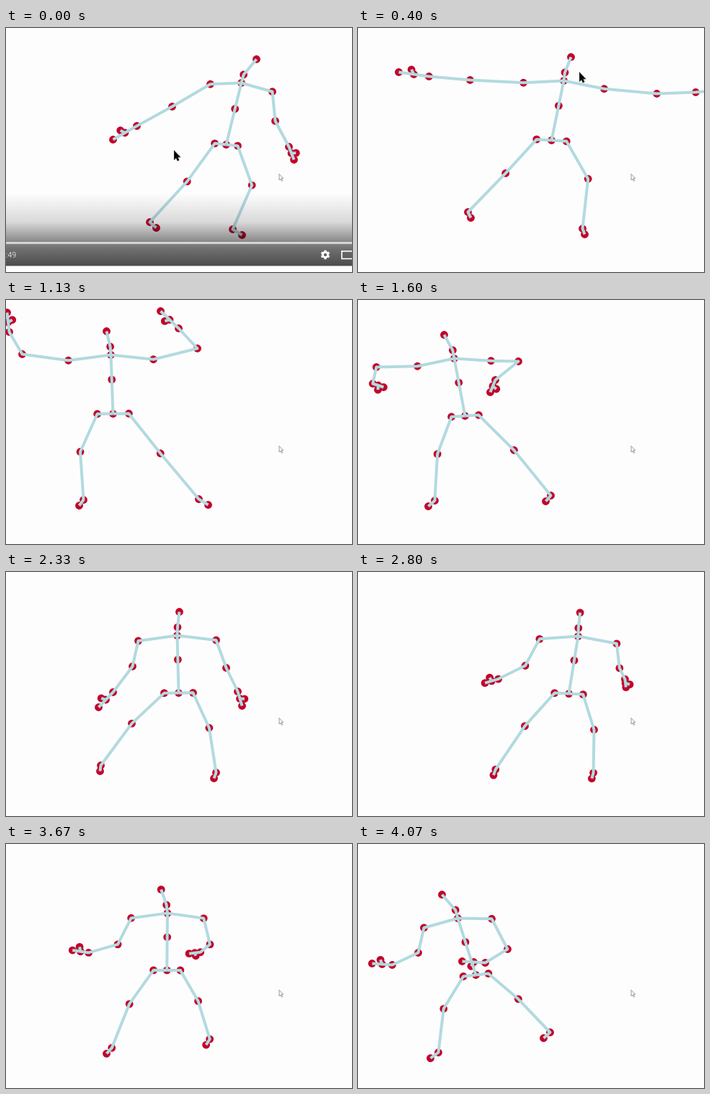
Write an HTML page with a canvas that moves like this. It is 480x340 px and loops after 4140 ms.

```html
<!DOCTYPE html>
<html lang="en">
<head>
<meta charset="utf-8">
<title>Dancing skeleton</title>
<style>
html, body { margin: 0; width: 100%; height: 100%; overflow: hidden; background: #fefdfe; }
canvas { display: block; }
</style>
</head>
<body>
<canvas id="stage" width="480" height="340"></canvas>
<script>
const ctx = document.getElementById('stage').getContext('2d');
const LOOP = 4140, RATE = 15, LAST = 61;

const add = (p, x, y) => [p[0] + x, p[1] + y];
const mix = (p, q, u) => [p[0] + (q[0] - p[0]) * u, p[1] + (q[1] - p[1]) * u];

// A point on the way from p to q, pushed sideways by some pixels.
function beside(p, q, u, push) {
  const dx = q[0] - p[0], dy = q[1] - p[1], len = Math.hypot(dx, dy) || 1;
  return add(mix(p, q, u), push * dy / len, -push * dx / len);
}

// Head, neck, chest, middle and base; shoulders and hips tilt with the lean.
function torso(x, y, lean, rise, nod, width) {
  const base = [x, y], chest = add(base, lean, -rise);
  return {
    spine: [add(chest, nod, -33), add(chest, nod * .15, -11.5), chest, mix(chest, base, .42), base],
    shoulder: side => add(chest, side * width, 7 + side * lean * .25),
    hip: side => add(base, side * width * .37, side * lean * .08)
  };
}

function arm(body, side, [ex, ey, wx, wy, tx, ty]) {
  const wrist = [wx, wy], tip = [tx, ty];
  return [body.shoulder(side), [ex, ey], wrist, mix(wrist, tip, .5), tip,
    beside(wrist, tip, .6, side * 6)];
}

function leg(body, side, [ax, ay, bend, toe]) {
  const hip = body.hip(side), ankle = [ax, ay];
  return [hip, beside(hip, ankle, .46, bend), ankle, add(ankle, toe, 8)];
}

// Arms: elbow, wrist and fingertip. Legs: ankle, knee bend and toe direction.
function key(step, trunk, leftArm, rightArm, leftLeg, rightLeg) {
  const body = torso(...trunk);
  const joints = [...body.spine, ...arm(body, -1, leftArm), ...arm(body, 1, rightArm),
    ...leg(body, -1, leftLeg), ...leg(body, 1, rightLeg)];
  return { step, joints };
}

const keys = [
  key(0, [305, 162, 21, 86, 21, 43],
    [230, 109, 181, 136, 148, 155], [373, 129, 392, 165, 399, 183],
    [199, 270, 4, 9], [314, 280, 23, 13]),
  key(6, [268, 156, 17, 83, 10, 56],
    [155, 72, 98, 67, 56, 61], [414, 91, 468, 89, 505, 86],
    [152, 256, 1, 4], [311, 279, 20, 3]),
  key(17, [148, 158, -3, 82, -6, 59],
    [22, 75, 4, 44, 1, 17], [265, 67, 239, 39, 214, 15],
    [107, 278, -15, -6], [267, 277, -1, 13]),
  key(24, [148, 161, -15, 80, -14, 51],
    [25, 93, 20, 116, 35, 121], [222, 85, 190, 111, 183, 128],
    [106, 279, -9, -9], [267, 272, 4, -7]),
  key(35, [239, 168, -2, 80, 3, 54],
    [175, 131, 148, 167, 128, 188], [305, 133, 321, 166, 327, 186],
    [131, 269, -6, -1], [291, 279, 8, -3]),
  key(49, [273, 170, 20, 80, 2, 53],
    [214, 130, 171, 139, 153, 136], [345, 134, 347, 140, 345, 146],
    [176, 278, -4, -4], [299, 279, 9, -2]),
  key(61, [163, 182, -25, 79, -22, 47],
    [83, 151, 47, 168, 19, 166], [207, 146, 176, 165, 144, 163],
    [111, 290, -12, -11], [266, 262, 3, -9])
];

// The dancer sways to the right between the two calm poses.
const sway = keys[4].joints.map((p, i) => add(mix(p, keys[5].joints[i], .5), 33, 0));
keys.splice(5, 0, { step: 40, joints: sway });

const chains = [
  [0, 1, 2, 3, 4],
  [2, 5, 6, 7, 8, 9], [8, 10],
  [2, 11, 12, 13, 14, 15], [14, 16],
  [4, 17, 18, 19, 20],
  [4, 21, 22, 23, 24]
];

function slope(k, i, axis) {
  const a = keys[Math.max(k - 1, 0)], b = keys[Math.min(k + 1, keys.length - 1)];
  return (b.joints[i][axis] - a.joints[i][axis]) / (b.step - a.step);
}

// Smooth curve through the key poses.
function poseAt(step) {
  let k = 0;
  while (k < keys.length - 2 && step >= keys[k + 1].step) k++;
  const a = keys[k], b = keys[k + 1], span = b.step - a.step;
  const u = (step - a.step) / span, w = 1 - u;
  return a.joints.map((p, i) => p.map((v, axis) =>
    w * w * (1 + 2 * u) * v + u * u * (3 - 2 * u) * b.joints[i][axis] +
    span * u * w * (w * slope(k, i, axis) - u * slope(k + 1, i, axis))));
}

function drawSkeleton(joints) {
  ctx.save();
  ctx.translate(.5, .5);
  ctx.fillStyle = '#c2032a';
  for (const [x, y] of joints) {
    ctx.beginPath();
    ctx.arc(x, y, 5.4, 0, 7);
    ctx.fill();
  }
  ctx.strokeStyle = '#b2dadf';
  ctx.lineWidth = 4;
  ctx.lineJoin = 'round';
  for (const chain of chains) {
    ctx.beginPath();
    for (const j of chain) ctx.lineTo(...joints[j]);
    ctx.stroke();
  }
  ctx.restore();
}

function drawPointer(x, y, size, fill, stroke) {
  ctx.save();
  ctx.translate(x, y);
  ctx.scale(size, size);
  ctx.beginPath();
  for (const [px, py] of [[0,0], [0,12], [2.7,9.5], [4.8,14], [6.6,13.2], [4.6,8.8], [8.2,8.6]])
    ctx.lineTo(px, py);
  ctx.closePath();
  ctx.fillStyle = fill;
  ctx.strokeStyle = stroke;
  ctx.lineWidth = 1.2;
  ctx.fill();
  ctx.stroke();
  ctx.restore();
}

const TOP = 230, BOTTOM = 331.5;
const shade = ctx.createLinearGradient(0, TOP, 0, BOTTOM);
for (const [y, a] of [[TOP, 0], [270, .14], [295, .43], [308, .56], [BOTTOM, .7]])
  shade.addColorStop((y - TOP) / (BOTTOM - TOP), `rgba(0,0,0,${a})`);

function drawGear(x, y) {
  ctx.save();
  ctx.translate(x, y);
  ctx.fillStyle = ctx.strokeStyle = '#fff';
  for (let i = 0; i < 6; i++) {
    ctx.fillRect(-1.6, -6.3, 3.2, 4);
    ctx.rotate(Math.PI / 3);
  }
  ctx.lineWidth = 2.8;
  ctx.beginPath();
  ctx.arc(0, 0, 3.6, 0, 7);
  ctx.stroke();
  ctx.restore();
}

function drawControls(alpha) {
  ctx.globalAlpha = alpha;
  ctx.fillStyle = shade;
  ctx.fillRect(0, TOP, 480, BOTTOM - TOP);
  ctx.fillStyle = 'rgba(255,255,255,.65)';
  ctx.fillRect(0, 298, 480, 3);
  ctx.fillStyle = '#d0d0d0';
  ctx.font = '11px Roboto, sans-serif';
  ctx.textAlign = 'right';
  ctx.fillText('2:49', 14.5, 320);
  drawGear(443, 316);
  ctx.strokeStyle = '#fff';
  ctx.lineWidth = 1.6;
  ctx.strokeRect(465.8, 311, 22, 10.5);
  ctx.globalAlpha = 1;
}

function draw(now) {
  const step = Math.min(LAST, Math.floor((now % LOOP + 4) * RATE / 1000));
  ctx.fillStyle = '#fefdfe';
  ctx.fillRect(0, 0, 480, 340);
  drawSkeleton(poseAt(step));
  drawPointer(379, 203.5, .7, '#fff', '#858585');
  const fade = Math.max(0, 1 - step / 4);
  if (fade) drawControls(fade);
  if (step < 10) {
    const u = Math.min(1, step / 6);
    drawPointer(233.5 + 74 * u, 171.5 - 109 * u, .95, '#000', '#222');
  }
}

const start = performance.now();
function tick() {
  draw(performance.now() - start);
  requestAnimationFrame(tick);
}
tick();
</script>
</body>
</html>
```
